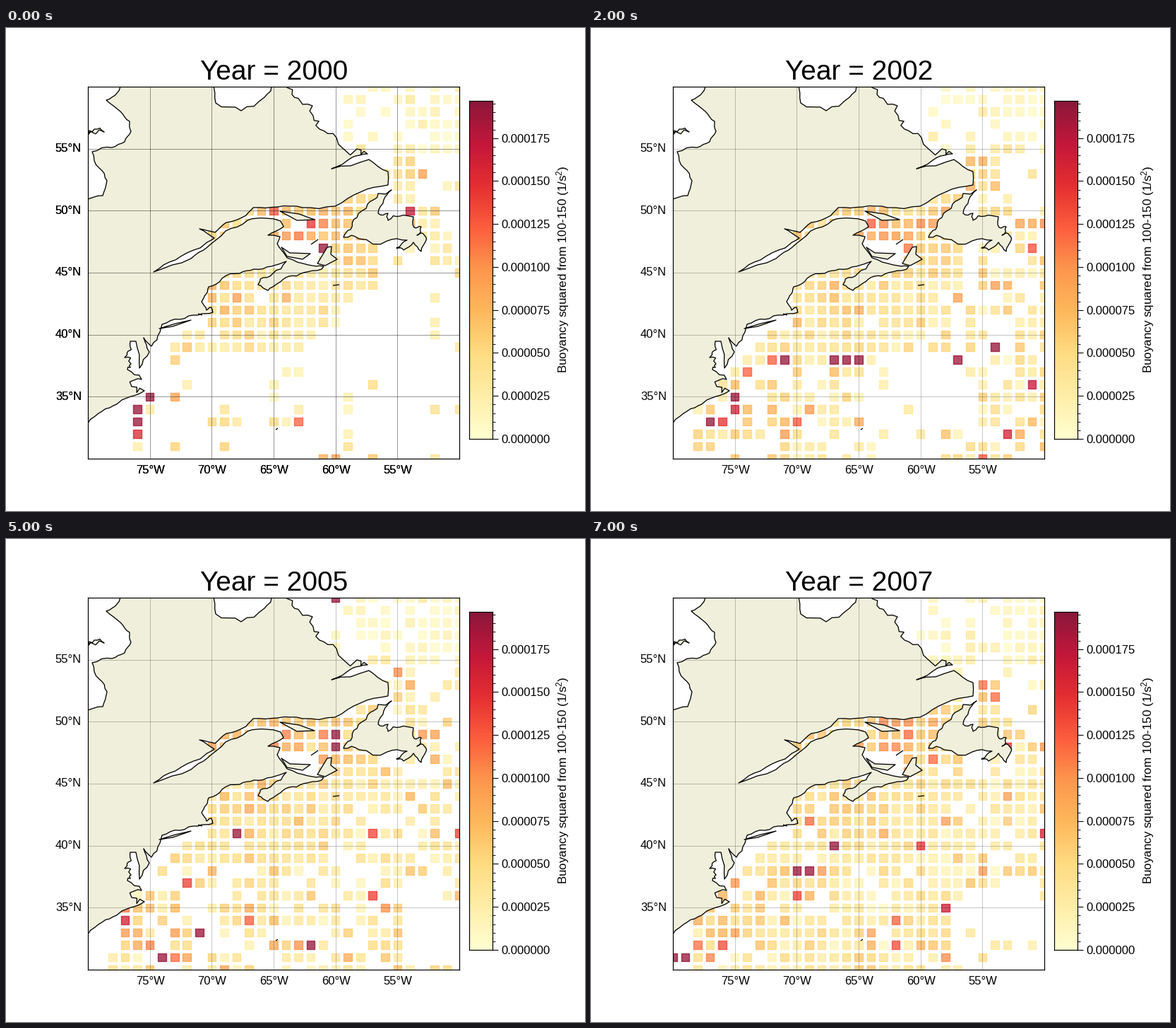
Animation, 820 px wide and 683 px high, one loop 8000 ms. Source, as a matplotlib script:

```python
import matplotlib.pyplot as plt
import numpy as np
from matplotlib.animation import FuncAnimation
from matplotlib.patches import Polygon

W, H, DPI = 820, 683, 64
PX = 72 / DPI                      # points per pixel
LEFT, RIGHT, TOP, BOTTOM = 116, 642, 83, 609
STEP = (RIGHT - LEFT) / 30         # pixels per degree
VMAX = 196.7                       # colour scale top, in 1e-6 / s^2
FIRST_YEAR = 2000
LAND = "#efefdb"
plt.rcParams["font.family"] = "Liberation Sans"


# ---- coastlines: key points in stage pixels, roughened ----
def rough(points, amp, rounds=2, seed=5):
    """Split every segment, pushing its middle sideways by a share of its length."""
    rng = np.random.default_rng(seed)
    points = np.array(points, float)
    for _ in range(rounds):
        a, b = points[:-1], points[1:]
        normal = (b - a)[:, ::-1] * (1, -1)
        middle = (a + b) / 2 + normal * rng.uniform(-amp, amp, (len(a), 1))
        out = np.empty((2 * len(points) - 1, 2))
        out[::2], out[1::2] = points, middle
        points = out
    return points


hudson = [(163, 78), (158, 91), (142, 102), (162, 118), (175, 132), (177, 146),
          (168, 161), (150, 169), (122, 175), (132, 198), (143, 216), (137, 237),
          (110, 245)]
carolina = [(110, 564), (131, 545), (152, 534), (169, 524), (196, 513)]
sounds = [(196, 513), (178, 507), (192, 497), (172, 483), (177, 475), (168, 466),
          (173, 457), (176, 443)]
delmarva = [(184, 443), (189, 481), (203, 458), (195, 438), (206, 450), (218, 430)]
new_england = [(221, 419), (246, 412), (272, 406), (293, 402), (291, 395), (284, 399),
               (277, 387), (281, 379), (287, 366), (306, 354), (331, 347), (351, 341),
               (376, 337), (397, 330), (378, 347), (360, 355), (357, 363), (371, 371),
               (385, 361), (401, 351), (421, 346), (447, 341)]
gulf = [(450, 337), (428, 335), (398, 325), (384, 305), (388, 295), (371, 293),
        (393, 281), (389, 273), (368, 269), (342, 272), (311, 287), (285, 310),
        (262, 326), (209, 345), (240, 328), (275, 311), (295, 297), (274, 284),
        (296, 289), (312, 275), (340, 265), (350, 254), (385, 253), (420, 254),
        (466, 252), (502, 232), (541, 222), (541, 203), (514, 186), (461, 199),
        (490, 183), (512, 178)]
labrador = [(512, 178), (497, 171), (468, 155), (444, 143), (435, 124), (420, 108),
            (405, 94), (391, 78)]
ungava = [(380, 78), (366, 98), (333, 117), (297, 106), (291, 78)]
newfoundland = [(478, 296), (488, 285), (497, 268), (512, 249), (527, 234), (546, 229),
                (535, 243), (527, 262), (541, 262), (541, 272), (558, 266), (577, 267),
                (578, 282), (588, 281), (582, 293), (591, 291), (595, 300), (588, 316),
                (577, 303), (563, 314), (553, 311), (568, 300), (540, 301), (500, 298),
                (478, 296)]
mainland = np.vstack([rough(hudson, 0.1), rough(carolina, 0.08), rough(sounds, 0.5),
                      rough(delmarva, 0.1), rough(new_england, 0.12), rough(gulf, 0.06),
                      rough(labrador, 0.45), rough(ungava, 0.15)])
islands = [rough(newfoundland, 0.2),
           [(441, 333), (455, 310), (461, 309), (460, 320), (469, 327), (452, 336)],
           [(388, 259), (415, 263), (437, 271), (412, 272)],
           [(390, 310), (402, 318), (431, 319), (420, 327), (398, 323)],
           [(217, 425), (240, 418), (262, 413), (236, 422)],
           rough([(115, 152), (125, 143), (139, 147), (115, 152)], 0.4)]
islets = [[(432, 306), (442, 299)], [(463, 364), (472, 363)], [(382, 568), (385, 566)],
          [(272, 404), (278, 406)]]


# ---- ocean cells, longitudes in degrees west ----
def bump(lon, lat, x, y, rx, ry):
    return np.exp(-((lon - x) / rx) ** 2 - ((lat - y) / ry) ** 2)


def typical(lon, lat):
    """Usual level: weak in the far north, strong in the gulf and off the capes."""
    return (12 + 25 / (1 + np.exp(2 * (lat - 54.5)))
            + 52 * bump(lon, lat, 63, 48.5, 7, 2.5)
            + 22 * bump(lon, lat, 67, 42.5, 4, 2)
            + 25 * bump(lon, lat, 55, 54, 1.5, 1.5)
            + 28 * bump(lon, lat, 76, 34, 4, 3))


def on_shelf(lon, lat):
    shallow = 61 < lon < 66 and 45 < lat < 48
    return 39 <= lat <= 51 and lon >= 57 + max(0, 1.2 * (44 - lat)) and not shallow


def chance(lon, lat, spread, gap):
    """How likely a cell holds a value."""
    if lon > (min(78, 112 - lat) if lat <= 40 else 70):
        return 0
    if on_shelf(lon, lat):
        return 0.97
    if lat >= 55:
        return 0.97 - 0.07 * (lon - 50) if lon <= 60 else 0
    if lat > 45:
        bank = min(54.5, 54.5 - 0.8 * (51 - lat))
        return 0.85 if abs(lon - bank) < 1.2 else 0.2 * (lon < 58)
    x, y, radius = gap
    return spread * (0.15 if np.hypot(lon - x, lat - y) < radius else 1)


def season(year, spread, hot, gap, peaks):
    rng = np.random.default_rng(year)
    cells = {}
    for lat in range(30, 61):
        for lon in range(50, 81):
            if rng.random() > chance(lon, lat, spread, gap):
                continue
            shelf = on_shelf(lon, lat)
            level = typical(lon, lat) * rng.lognormal(0, 0.25 if shelf else 0.5)
            if lat < 42 and not shelf and rng.random() < hot:
                level = rng.uniform(120, VMAX)
            cells[lon, lat] = level
    cells.update(dict.fromkeys(peaks, 190))
    return cells


# spread of the open-ocean cells, share of hot ones, a sparse disc, strongest cells
YEARS = [
    (0.14, 0.00, (57, 41, 5), [(75, 35), (76, 34), (76, 33), (61, 47)]),
    (0.45, 0.04, (55, 35, 4), [(75, 35), (70, 38)]),
    (0.65, 0.06, (60, 34, 4.5), [(75, 35), (77, 33), (71, 38), (67, 38), (66, 38),
                                 (65, 38), (54, 39)]),
    (0.72, 0.09, (52, 42, 2), [(53, 45), (63, 49), (68, 41), (61, 41), (61, 40), (64, 38)]),
    (0.78, 0.03, (52, 43, 3), [(67, 50), (59, 38), (75, 35), (76, 34), (61, 34), (55, 31)]),
    (0.62, 0.04, (52, 33, 3), [(60, 60), (60, 49), (60, 48), (68, 41), (71, 33), (62, 32)]),
    (0.68, 0.03, (56, 34, 3), [(69, 38), (61, 47)]),
    (0.82, 0.01, (53, 33, 5), [(67, 40), (70, 38), (69, 38), (80, 31), (79, 31)]),
]
seasons = [season(FIRST_YEAR + i, *setup) for i, setup in enumerate(YEARS)]

# ---- stage ----
fig = plt.figure(figsize=(W / DPI, H / DPI), dpi=DPI, facecolor="white")


def box(x0, y0, x1, y1):
    ax = fig.add_axes([x0 / W, 1 - y1 / H, (x1 - x0) / W, (y1 - y0) / H])
    for side in ax.spines.values():
        side.set_linewidth(1.2 * PX)
        side.set_zorder(9)
    return ax


def label(x, y, text, size=16.67, **kw):
    return fig.text(x / W, 1 - y / H, text, fontsize=size * PX, **kw)


ax = box(LEFT, TOP, RIGHT, BOTTOM)
ax.set(xlim=(LEFT, RIGHT), ylim=(BOTTOM, TOP), xticks=[], yticks=[])


def coast(points, **kw):
    ax.add_patch(Polygon(points, fc=LAND, ec="black", lw=1.3 * PX,
                         joinstyle="round", zorder=3, **kw))


for shape in [mainland, *islands]:
    coast(shape)
for shape in islets:
    coast(shape, closed=False)


def graticule():
    line = dict(color="black", alpha=0.25, lw=0.9 * PX, zorder=5)
    drawn = []
    for k in range(1, 6):
        x, y = LEFT + 5 * k * STEP, BOTTOM - 5 * k * STEP
        drawn += [ax.axvline(x, **line), ax.axhline(y, **line),
                  label(x + 0.5, 630, f"{80 - 5 * k}°W", ha="center", va="baseline"),
                  label(107, y + 4.5, f"{30 + 5 * k}°N", ha="right", va="baseline")]
    return drawn


graticule()
extras = graticule()   # the first year carries a second, darkening set
title = label(379.5, 73, "", 38.9, ha="center", va="baseline")

bar = box(656, 103, 689, 581)
bar.imshow(np.linspace(0, 1, 256)[:, None], cmap="YlOrRd", origin="lower",
           extent=(0, 1, 0, VMAX), aspect="auto", alpha=0.91)
bar.yaxis.tick_right()
bar.set_xticks([])
marks = range(0, 176, 25)
bar.set_yticks(marks, [f"{m * 1e-6:.6f}" for m in marks])
bar.set_yticks(range(0, 197, 5), minor=True)
bar.tick_params(axis="y", length=8 * PX, width=1.1 * PX, pad=4 * PX,
                labelsize=16.67 * PX)
bar.tick_params(axis="y", which="minor", length=4 * PX, width=0.9 * PX)
label(789, 341.5, r"Buoyancy squared from 100-150 (1/s$\mathregular{^2}$)", 17,
      rotation=90, ha="center", va="center")

cells = ax.scatter([], [], marker="s", s=(11.6 * PX) ** 2, linewidths=1.4 * PX, zorder=2)
cmap = plt.get_cmap("YlOrRd")


def draw(i):
    data = seasons[i]
    lon, lat = np.array(list(data)).T
    colors = cmap(np.array(list(data.values())) / VMAX)
    colors[:, 3] = 0.7
    cells.set_offsets(np.column_stack([LEFT + (80 - lon) * STEP,
                                       BOTTOM - (lat - 30) * STEP]))
    cells.set_facecolor(colors)
    cells.set_edgecolor(colors)
    title.set_text(f"Year = {FIRST_YEAR + i}")
    for item in extras:
        item.set_visible(i == 0)
    return [cells, title, *extras]


anim = FuncAnimation(fig, draw, frames=len(seasons), interval=1000, repeat=True,
                     init_func=lambda: draw(0), blit=False)
plt.show()
```
